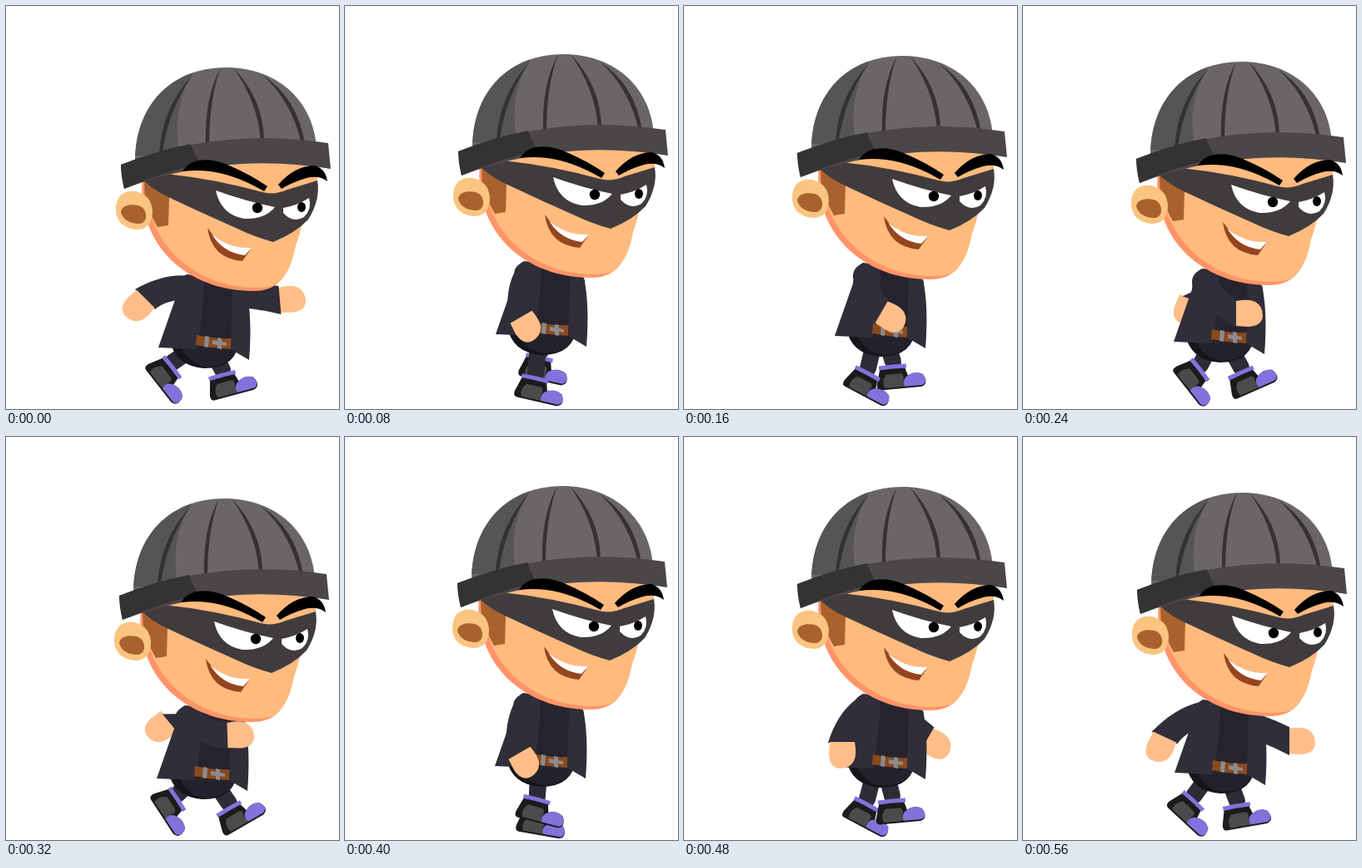
Recreate the animation shown at these times as an HTML page. Size 400 by 485 pixels, loop 600 ms.

```html
<!DOCTYPE html>
<html lang="en">
<head>
<meta charset="utf-8">
<title>Walking burglar</title>
<style>
  html, body { margin: 0; width: 100%; height: 100%; overflow: hidden; background: #fff; }
  svg { display: block; width: 100%; height: 100%; }
  .cloth { fill: #312d39; }
  .skin { fill: #ffba7d; }
  .leg { fill: none; stroke: #2d2b36; stroke-width: 20; stroke-linecap: round; }
</style>
</head>
<body>
<svg viewBox="0 0 400 485">
  <defs>
    <g id="boot">
      <path fill="#1b1b1c" d="M-16 2H14L17 12Q26 7 35 12Q42 24 32 27H-17Q-22 27-21 20Z"/>
      <path fill="#4b4b4b" d="M-9 9H9Q13 11 11 17L12 25H-12Q-16 17-9 9Z"/>
      <path fill="#8172dc" d="M-17-2Q0-3 16-2V3Q0 2-17 3ZM12 25Q9 16 17 12Q27 7 35 12Q41 22 33 25Z"/>
    </g>
    <path id="hand" fill="#ffbe89" d="M-15-1H15Q18 14 14 22Q9 31-3 31Q-15 30-16 14Z"/>
    <clipPath id="dome"><path d="M155 190C154 118 200 74 264 74C328 74 370 116 373 172Z"/></clipPath>
  </defs>

  <path id="farLeg" class="leg"/>
  <use id="farBoot" href="#boot"/>
  <use id="farHand" href="#hand"/>
  <path id="farSleeve" class="cloth"/>
  <path id="nearLeg" class="leg"/>
  <use id="nearBoot" href="#boot"/>

  <g id="body">
    <path fill="#15151a" d="M197 400H280Q278 435 238 435Q202 432 197 400Z"/>
    <path fill="#23222c" d="M208 400H281Q277 433 240 433Q213 428 208 400Z"/>
    <path class="cloth" d="M217 322Q206 327 205 347L183 410L229 412L290 410V345L275 328Z"/>
    <path fill="#27232e" d="M238 330H275L272 412H229Q236 380 238 330Z"/>
    <path fill="#8a4a1d" d="M229 395Q250 400 271 399L270 412Q249 411 228 407Z"/>
    <path fill="#8b8b8e" d="M239 396L244 397L243 410L238 409ZM248 401L254 402V398L259 399V403L265 404V408L259 407V412L254 411V407L248 406Z"/>
    <path class="cloth" d="M272 338L289 342Q296 375 292 425L270 412Z"/>
  </g>

  <path id="nearSleeve" class="cloth"/>
  <use id="nearHand" href="#hand"/>

  <g id="head">
    <path fill="#ff9468" d="M164 205C156 288 218 343 297 343Q320 343 331 329L300 200Z"/>
    <path class="skin" d="M168 200C163 284 224 338 300 339Q316 339 325 335Q342 322 348 288Q354 272 355 262L374 232V186H220Z"/>
    <path fill="#a9622d" d="M166 209L181 206L196 230L195 264L182 266L167 238Z"/>
    <path fill="#fac580" d="M132 244C132 227 144 221 156 223Q175 228 176 247Q176 268 158 269C142 268 132 260 132 244Z"/>
    <path fill="#a9622d" d="M138 248C139 240 149 238 159 240Q169 243 168 255Q166 263 157 262Q141 260 138 248Z"/>

    <path fill="#403c3e" d="M165 207L192 202Q250 208 308 224Q322 228 338 221L374 210Q378 233 363 257Q348 273 321 284Q299 278 278 268Q235 249 195 230Q178 222 165 210Z"/>
    <path fill="#fff" d="M252 222Q288 235 323 242Q311 257 286 256Q258 251 252 222ZM333 243Q350 240 364 231Q368 244 358 254Q345 262 333 249Z"/>
    <circle cx="302" cy="243" r="6.2"/>
    <ellipse cx="355" cy="242" rx="5" ry="6"/>

    <path fill="#95451f" d="M242 267Q260 293 295 291L284 307Q247 304 242 267Z"/>
    <path fill="#fff" d="M247 274Q266 292 295 291L287 300Q260 297 247 274Z"/>

    <g clip-path="url(#dome)">
      <path fill="#6a6668" d="M150 70H380V200H150Z"/>
      <path fill="#575456" d="M150 70H232Q196 118 209 180H150Z"/>
      <g fill="#343233">
        <path d="M224 83Q187 123 184 178L188 176Q195 125 224 83Z"/>
        <path d="M258 74Q238 110 240 168H244Q244 112 258 74Z"/>
        <path d="M273 74Q302 115 306 162L310 161Q309 112 273 74Z"/>
        <path d="M308 83Q343 114 355 166H359Q350 110 308 83Z"/>
      </g>
    </g>
    <path fill="#4b4749" d="M138 191Q258 145 387 165L390 196Q260 175 142 220Z"/>
    <path fill="#343233" d="M138 191Q180 174 222 166Q226 179 234 190Q187 200 142 220Q138 205 138 191Z"/>
    <path d="M212 199C222 183 244 182 266 191Q294 203 314 217L310 223Q276 203 245 199Q229 197 212 199Z"/>
    <path d="M327 215Q347 192 371 192Q384 196 386 211Q376 203 361 207Q344 212 331 220Z"/>
  </g>
</svg>

<script>
const STEP = 80, LOOP = 600;
// Joints are [x, y, degrees]; cuffs and ankles turn from a relaxed downward pose.
const poses = [
  { head: [0, 0],    nearCuff: [167, 353, 45],  farCuff: [329, 354, -95], nearAnkle: [260, 444, -15], farAnkle: [200, 435, 52] },
  { head: [-2, -16], nearCuff: [212, 375, -30], farCuff: [245, 365, -20], nearAnkle: [229, 448, 13],  farAnkle: [234, 423, 13] },
  { head: [-2, -14], nearCuff: [238, 369, -60], farCuff: [217, 362, 0],   nearAnkle: [221, 442, 28],  farAnkle: [251, 434, -5] },
  { head: [-2, -7],  nearCuff: [257, 370, -90], farCuff: [202, 353, 20],  nearAnkle: [213, 438, 52],  farAnkle: [262, 441, -24] },
  { head: [-2, 0],   nearCuff: [267, 359, -92], farCuff: [195, 342, 50],  nearAnkle: [206, 436, 57],  farAnkle: [268, 447, -30] },
  { head: [-3, -15], nearCuff: [210, 381, -30], farCuff: [245, 368, -20], nearAnkle: [231, 436, 15],  farAnkle: [230, 451, 10] },
  { head: [-2, -14], nearCuff: [190, 368, 0],   farCuff: [292, 364, -60], nearAnkle: [250, 438, -5],  farAnkle: [220, 442, 28] },
  { head: [-1, -7],  nearCuff: [170, 362, 25],  farCuff: [320, 366, -90], nearAnkle: [257, 444, -10], farAnkle: [205, 438, 43] }
];

const part = id => document.getElementById(id);
const place = (id, x, y, angle = 0) =>
  part(id).setAttribute("transform", `translate(${x} ${y}) rotate(${angle})`);

// A sleeve runs from shoulder to cuff, both edges bowed sideways by the same amount.
function poseArm(side, [sx, sy], [x, y, angle], cuffHalf, bow) {
  const a = angle * Math.PI / 180, cos = Math.cos(a), sin = Math.sin(a);
  const length = Math.hypot(x - sx, y - sy);
  const ux = (x - sx) / length, uy = (y - sy) / length;
  const edge = sign => {
    const px = sx + sign * 15 * uy, py = sy - sign * 15 * ux;
    return {
      root: `${px} ${py}`,
      bend: `${px + ux * length / 2 + bow * uy} ${py + uy * length / 2 - bow * ux}`,
      cuff: `${x + sign * cuffHalf * cos} ${y + sign * cuffHalf * sin}`
    };
  };
  const left = edge(-1), right = edge(1);
  part(side + "Sleeve").setAttribute("d",
    `M${left.root}Q${left.bend} ${left.cuff}L${right.cuff}Q${right.bend} ${right.root}A15 15 0 0 0 ${left.root}Z`);
  place(side + "Hand", x, y, angle);
}

function poseLeg(side, [x, y], ankle) {
  const hipX = x + (ankle[0] - x) * .4;
  part(side + "Leg").setAttribute("d", `M${hipX} ${y}L${ankle[0]} ${ankle[1] - 6}`);
  place(side + "Boot", ...ankle);
}

function show(pose) {
  const [x, y] = pose.head, bodyY = y + 1;
  const hips = [238 + x, 412 + bodyY];
  place("head", x, y);
  place("body", x, bodyY);
  poseArm("near", [220 + x, 338 + bodyY], pose.nearCuff, 17, -9);
  poseArm("far", [250 + x, 345 + bodyY], pose.farCuff, pose.farCuff[2] > 0 ? 11 : 17, 4);
  poseLeg("near", hips, pose.nearAnkle);
  poseLeg("far", hips, pose.farAnkle);
}

let start, shown;
function tick(now) {
  start ??= now;
  const index = Math.floor((now - start) % LOOP / STEP);
  if (index !== shown) show(poses[shown = index]);
  requestAnimationFrame(tick);
}
show(poses[0]);
requestAnimationFrame(tick);
</script>
</body>
</html>
```
